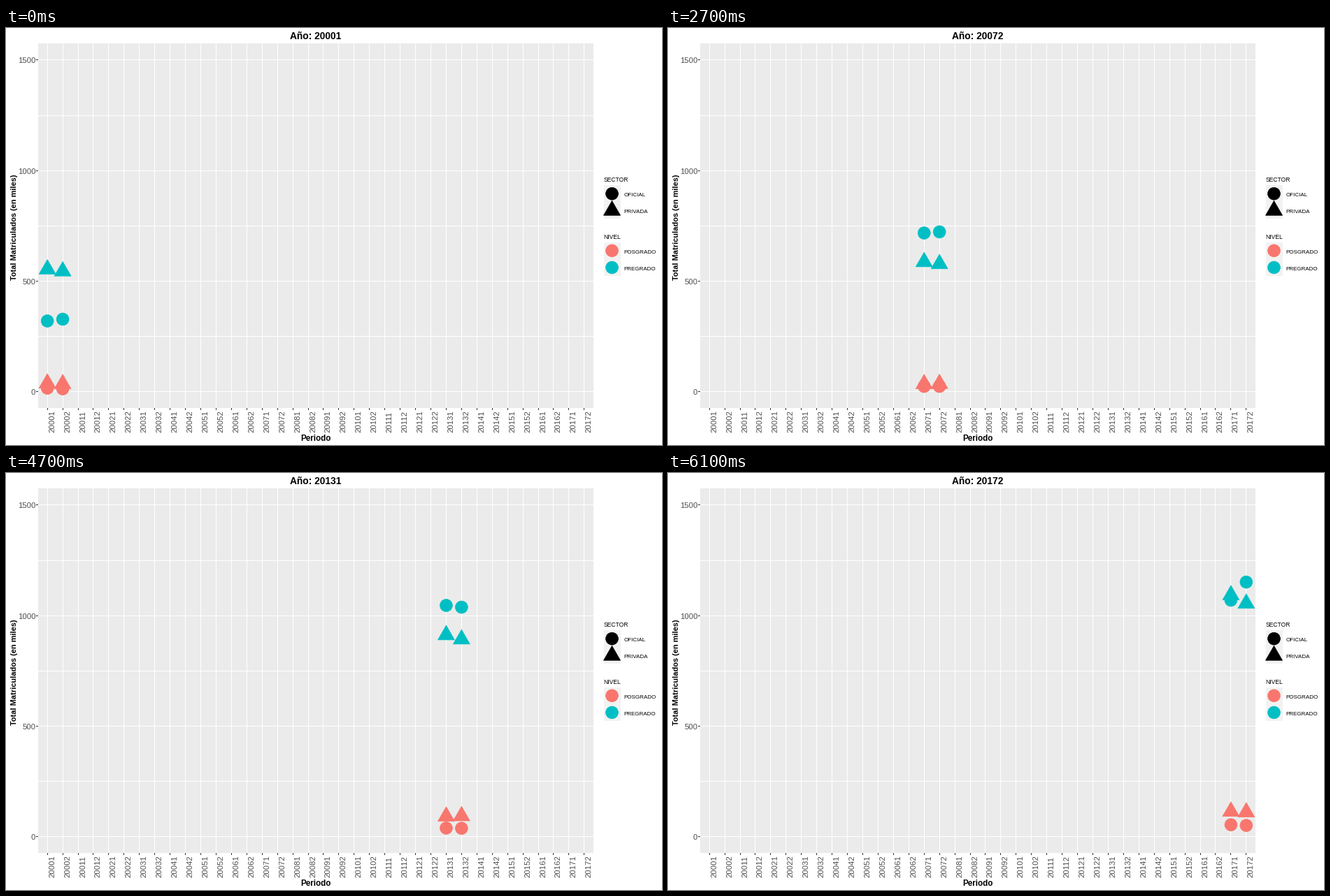
Animation, 938 px wide and 597 px high, one loop 8000 ms. Source, as a matplotlib script:

```python
import math

import matplotlib.pyplot as plt
import numpy as np
from matplotlib.animation import FuncAnimation
from matplotlib.patches import Circle, Polygon, Rectangle

W, H, DPI = 938, 597, 64
STEP_MS, LOOP_MS = 100, 8000
LEFT, RIGHT, TOP, BOTTOM = 46, 840, 22, 544
YEARS = 18
STEPS = 29
FIRST, LAST = 20001, 20172
CORAL, TEAL = "#F8766D", "#00BFC4"
GREY = "#4D4D4D"
RADIUS = 8.9

plt.rcParams["font.family"] = ["Liberation Sans", "DejaVu Sans"]

# Enrolment (thousands) at key years; first and second term of each year.
KEY_YEARS = [0, 2, 4, 7, 11, 14, 17]
SERIES = [
    ("circle", CORAL, [16, 19, 20, 24, 35, 41, 54],
                      [13, 15, 17, 24, 32, 41, 51]),
    ("triangle", CORAL, [38, 36, 28, 35, 79, 98, 114],
                        [35, 32, 28, 36, 79, 101, 111]),
    ("circle", TEAL, [320, 377, 478, 718, 969, 1085, 1070],
                     [328, 400, 497, 723, 925, 1095, 1152]),
    ("triangle", TEAL, [554, 535, 540, 587, 783, 977, 1093],
                       [545, 533, 527, 578, 766, 957, 1055]),
]

fig = plt.figure(figsize=(W / DPI, H / DPI), dpi=DPI, facecolor="white")
ax = fig.add_axes([0, 0, 1, 1])
ax.set_xlim(0, W)
ax.set_ylim(H, 0)
ax.axis("off")


def px(size):
    return size * 72 / DPI


def x_pos(slot):
    unit = (RIGHT - LEFT) / (2 * YEARS + 0.2)
    return LEFT + (slot + 0.6) * unit


def y_pos(value):
    return 520.7 - value * 0.31647


def line(x0, y0, x1, y1, color):
    ax.plot([x0, x1], [y0, y1], color=color, lw=px(1), snap=False,
            solid_capstyle="butt", zorder=2)


def label(x, y, text, size, color="black", ha="left", weight="normal", turn=0):
    """Text whose capitals are centred on the given point."""
    drop = 0.36 * size
    x, y = (x + drop, y) if turn else (x, y + drop)
    return ax.text(x, y, text, fontsize=px(size), color=color, ha=ha,
                   va="baseline", weight=weight, rotation=turn,
                   rotation_mode="anchor", zorder=4)


def corners(x, y):
    r = RADIUS * 1.555
    return [(x, y - r), (x + r * math.cos(math.pi / 6), y + r / 2),
            (x - r * math.cos(math.pi / 6), y + r / 2)]


def marker(kind, color, x=0, y=0):
    if kind == "circle":
        patch = Circle((x, y), RADIUS)
    else:
        patch = Polygon(corners(x, y), joinstyle="round")
    patch.set(facecolor=color, edgecolor=color, linewidth=px(0.7),
              snap=False, zorder=3)
    return ax.add_patch(patch)


def move(patch, x, y):
    if isinstance(patch, Circle):
        patch.set_center((x, y))
    else:
        patch.set_xy(corners(x, y))


def draw_panel():
    ax.add_patch(Rectangle((LEFT, TOP), RIGHT - LEFT, BOTTOM - TOP,
                           facecolor="#EBEBEB", linewidth=0))
    for value in range(0, 1501, 250):
        y = math.floor(y_pos(value)) + 0.5
        line(LEFT, y, RIGHT, y, "white")
        if value % 500 == 0:
            line(LEFT - 3, y, LEFT, y, "#333333")
            label(42.2, y + 0.8, str(value), 11.3, GREY, "right")
    for slot in range(2 * YEARS):
        x = math.floor(x_pos(slot)) + 0.5
        line(x, TOP, x, BOTTOM, "white")
        line(x, BOTTOM, x, BOTTOM + 3, "#333333")
        name = str(FIRST + slot // 2 * 10 + slot % 2)
        label(x + 5.8, 579.3, name, 11.3, GREY, turn=90)
    label(442.5, 587.2, "Periodo", 11.6, ha="center", weight="bold")
    label(11.5, 285, "Total Matriculados (en miles)", 11, ha="center",
          weight="bold", turn=90)


def draw_legend(y, title, entries):
    label(854.5, y, title, 8.5)
    for i, (kind, color, name) in enumerate(entries):
        mid = y + 20.2 + 24.1 * i
        ax.add_patch(Rectangle((854.5, mid - 12), 24, 24,
                               facecolor="#F2F2F2", linewidth=0))
        marker(kind, color, 866.5, mid)
        label(883.3, mid + 1.3, name, 8)


def snapshot(step):
    """Slots and values of every point due at a step, one row per term."""
    rows = []
    for year in range(YEARS):
        for term in (0, 1):
            due = (10 * year + term) * STEPS / (LAST - FIRST)
            if round(due) == step:
                values = [np.interp(year, KEY_YEARS, s[2 + term])
                          for s in SERIES]
                rows.append([2 * year + term] + values)
    return np.array(rows)


def points(step):
    rows = snapshot(step)
    if len(rows):
        return rows
    # Steps with no data lie halfway between their neighbours.
    return (snapshot(step - 1) + snapshot(step + 1)) / 2


draw_panel()
draw_legend(217, "SECTOR", [("circle", "black", "OFICIAL"),
                            ("triangle", "black", "PRIVADA")])
draw_legend(298.6, "NIVEL", [("circle", CORAL, "POSGRADO"),
                             ("circle", TEAL, "PREGRADO")])
heading = label(442.5, 11.3, "", 13.8, ha="center", weight="bold")
markers = [[marker(kind, color) for kind, color, *_ in SERIES]
           for _ in range(2)]


def update(frame):
    step = min(max((frame * STEP_MS - 300) // 200, 0), STEPS)
    heading.set_text(f"Año: {round(FIRST + (LAST - FIRST) * step / STEPS)}")
    rows = points(step)
    for i, group in enumerate(markers):
        for j, patch in enumerate(group):
            patch.set_visible(i < len(rows))
            if i < len(rows):
                move(patch, x_pos(rows[i][0]), y_pos(rows[i][j + 1]))
    return [heading] + markers[0] + markers[1]


anim = FuncAnimation(fig, update, frames=LOOP_MS // STEP_MS, interval=STEP_MS,
                     init_func=lambda: update(0), repeat=True, repeat_delay=0)
plt.show()
```
